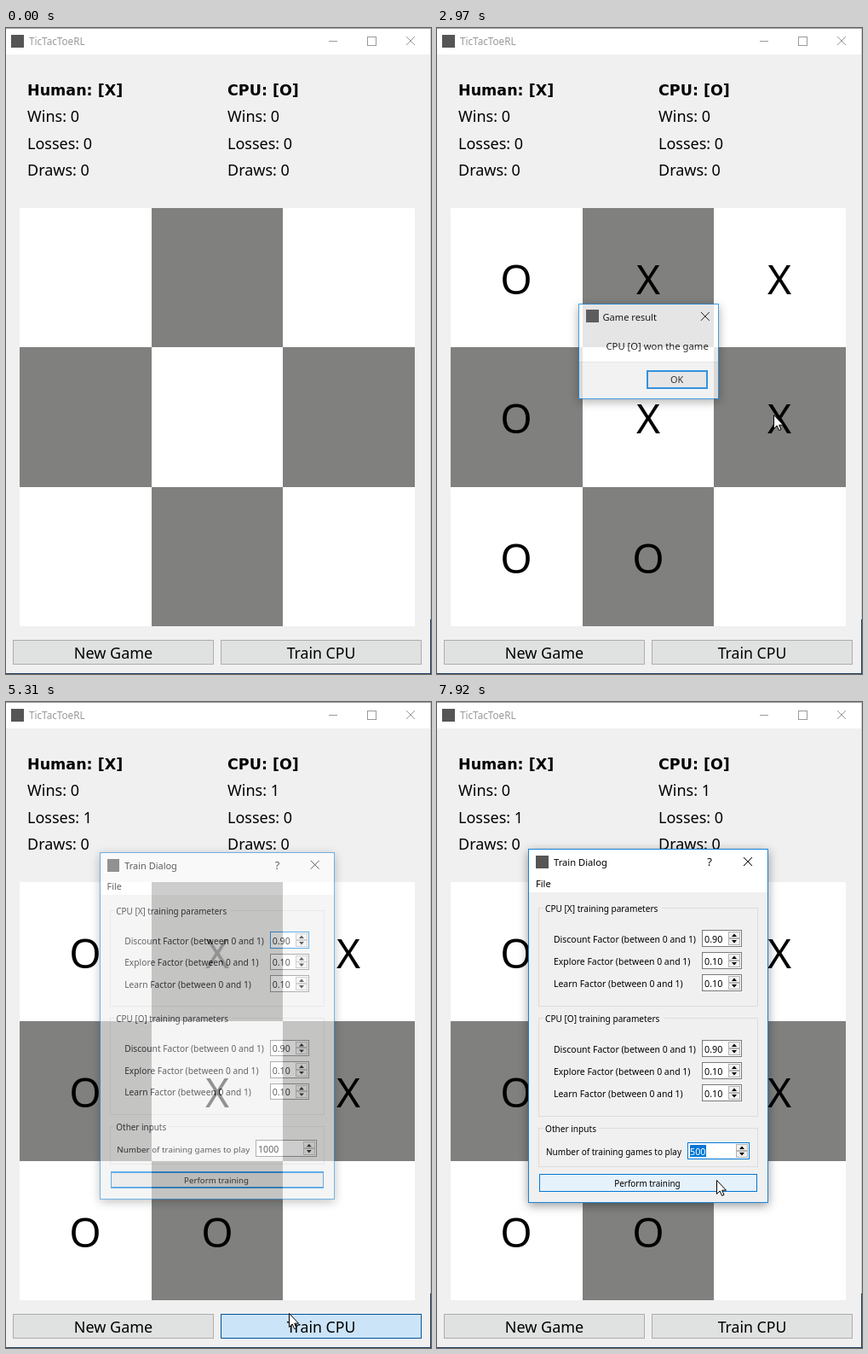
These frames come from a looping animation (499x757 px, 8000 ms). An HTML page:

```html
<!DOCTYPE html>
<html lang="en">
<head>
<meta charset="utf-8">
<title>TicTacToeRL</title>
<style>
html, body { margin: 0; width: 100%; height: 100%; overflow: hidden; background: #f0f0f0; }
svg { display: block; font-family: "Noto Sans", "Open Sans", sans-serif; }
rect { shape-rendering: crispEdges; }
.bold { font-family: "DejaVu Sans", sans-serif; font-weight: bold; }
.shadow { filter: drop-shadow(0 3px 6px rgba(0, 0, 0, .4)); }
</style>
</head>
<body>
<svg id="stage" width="499" height="757" viewBox="0 0 499 757"></svg>
<script>
const LOOP = 8000, TICK = 77.17, FIRST_TICK = 808;
const BLUE = '#0078d7', FRAME = '#1883d7', FACE = '#f0f0f0', BUTTON = '#e0e1e1';
const stage = document.getElementById('stage');
const clamp = v => Math.max(0, Math.min(1, v));

// Column, row, mark and the tick at which it is played
const MOVES = [
  [1, 1, 'X', 0], [0, 0, 'O', 0], [2, 0, 'X', 10], [0, 2, 'O', 11],
  [1, 0, 'X', 18], [1, 2, 'O', 19], [2, 1, 'X', 25], [0, 1, 'O', 26]
];

// Pointer path: tick, x, y
const PATH = [
  [-10, 370, 652], [-9, 301, 422], [-7, 301, 422], [-4, 250, 453], [1, 250, 453],
  [7, 365, 334], [12, 365, 334], [15, 275, 353], [20, 275, 353], [22, 349, 422],
  [23, 349, 422], [24, 395, 453], [32, 395, 453], [38, 303, 417], [43, 303, 417],
  [47, 317, 674], [48, 317, 674], [50, 332, 707], [53, 332, 707], [54, 332, 716],
  [60, 332, 716], [64, 278, 425], [66, 278, 425], [69, 303, 458], [70, 303, 458],
  [79, 354, 530], [85, 354, 530], [91, 328, 560]
];

const rect = (x, y, w, h, fill, extra = '') =>
  `<rect x="${x}" y="${y}" width="${w}" height="${h}" fill="${fill}" ${extra}/>`;
const box = (x, y, w, h, fill, stroke, line = 1) =>
  rect(x + line / 2, y + line / 2, w - line, h - line, fill, `stroke="${stroke}" stroke-width="${line}"`);
const text = (x, y, size, str, extra = '') =>
  `<text x="${x}" y="${y}" font-size="${size}" ${extra}>${str}</text>`;
const centered = (x, y, size, str) => text(x, y, size, str, 'text-anchor="middle"');
const path = (d, stroke, fill = 'none') => `<path d="${d}" stroke="${stroke}" fill="${fill}"/>`;
const group = (content, opacity) => opacity > 0 ? `<g opacity="${opacity}">${content}</g>` : '';
const closeIcon = (x, y, color) =>
  path(`M${x - 5} ${y - 5}l10 10m0 -10l-10 10`, color);
const appIcon = (x, y) => rect(x, y, 15, 15, '#555');

function pointer(tick) {
  let i = PATH.findIndex(p => p[0] > tick);
  if (i < 0) i = PATH.length;
  const a = PATH[i - 1], b = PATH[i] || a;
  const part = a === b ? 0 : (tick - a[0]) / (b[0] - a[0]);
  const x = Math.round(a[1] + (b[1] - a[1]) * part);
  const y = Math.round(a[2] + (b[2] - a[2]) * part);
  return `<g transform="translate(${x} ${y})">` +
    path('M.5 .5V16.5L4.2 13 6.6 18.5 9 17.5 6.7 12.2H11.5Z', '#000', '#fff') + '</g>';
}

function score(x, name, wins, losses) {
  return text(x, 79, 17.5, name, 'class="bold"') +
    text(x, 110, 18, `Wins: ${wins}`) +
    text(x, 142, 18, `Losses: ${losses}`) +
    text(x, 173, 18, 'Draws: 0');
}

function mainWindow(tick) {
  const active = tick >= 0 && tick < 27 || tick >= 40 && tick < 57;
  const ink = active ? '#000' : '#999', lost = +(tick >= 40);
  let out = rect(0, 0, 499, 757, FACE) + rect(0, 0, 499, 31, '#fff') +
    rect(0, 0, 499, 1, active ? FRAME : '#a0a0a0') +
    rect(498, 1, 1, 756, active ? FRAME : '#c8ccd0') +
    rect(0, 756, 499, 1, active ? FRAME : '#1c3f5e');
  if (!active) out += rect(498, 693, 1, 64, '#1c3f5e');
  out += appIcon(6, 8) + text(27, 20, 11.7, 'TicTacToeRL', `fill="${ink}"`) +
    rect(379, 15, 10, 1, ink) + box(424, 10, 11, 11, 'none', ink) + closeIcon(475, 15, ink) +
    score(25, 'Human: [X]', 0, lost) + score(260, 'CPU: [O]', lost, 0);

  const cols = [16, 171, 325, 480], rows = [211, 374, 538, 701];
  for (let c = 0; c < 3; c++) for (let r = 0; r < 3; r++)
    out += rect(cols[c], rows[r], cols[c + 1] - cols[c], rows[r + 1] - rows[r],
      (c + r) % 2 ? '#80807f' : '#fff');
  for (const [c, r, mark, at] of MOVES)
    if (tick >= at) out += centered([93, 248, 402][c], [312, 475, 639][r], 48, mark);

  out += box(8, 717, 236, 29, BUTTON, '#adadad') + box(252, 717, 236, 29, BUTTON, '#adadad');
  if (tick >= 54) {
    const pressed = tick >= 56;
    out += group(box(252, 717, 236, 29, pressed ? '#cce4f7' : '#e5f1fb', pressed ? '#005499' : BLUE),
      1 - clamp((tick - 58) / 3));
  }
  return out + centered(126, 739, 18, 'New Game') + centered(370, 739, 17.7, 'Train CPU');
}

// Dialogs fade and grow slightly around their centre
function dialog(x, y, w, h, alpha, content) {
  if (alpha <= 0) return '';
  const cx = x + w / 2, cy = y + h / 2, scale = .95 + .05 * alpha;
  return `<g opacity="${alpha}" transform="translate(${cx} ${cy}) scale(${scale}) translate(${-cx} ${-cy})">` +
    rect(x, y, w, h, '#fff', 'class="shadow"') + content + box(x, y, w, h, 'none', FRAME) + '</g>';
}

function resultDialog(tick) {
  const alpha = Math.min(clamp((tick - 26) / 2.5), clamp(1 - (tick - 39) / 3));
  const hover = tick >= 38;
  return dialog(165, 322, 167, 114, alpha,
    appIcon(174, 330) + text(194, 343, 11.2, 'Game result') + closeIcon(315.5, 337.5, '#000') +
    text(198, 377, 11.4, 'CPU [O] won the game') +
    rect(165, 392, 167, 44, FACE) + rect(165, 391, 167, 1, '#dfdfdf') +
    box(246, 401, 73, 22, hover ? '#e5f1fb' : '#e1e1e1', BLUE, hover ? 1 : 2) +
    centered(282, 416, 11, 'OK'));
}

function spinBox(x, y, w, value, focused, selected) {
  const bx = x + w - 16, mid = bx + 7;
  return box(x, y, w, 20, '#fff', focused ? BLUE : '#7a7a7a') +
    (selected ? rect(x + 3, y + 3, 19, 14, BLUE) : '') +
    text(x + 3, y + 15, 10.8, value, selected ? 'fill="#fff"' : '') +
    box(bx, y + 2, 14, 8, '#f0f0f0', '#b4b4b4') + box(bx, y + 10, 14, 8, '#f0f0f0', '#b4b4b4') +
    path(`M${mid - 3} ${y + 8}h6l-3 -3.5z`, 'none', '#000') +
    path(`M${mid - 3} ${y + 12}h6l-3 3.5z`, 'none', '#000');
}

const groupBox = (y, h, title, width) =>
  box(119, y, 258, h, 'none', '#dcdcdc') + rect(125, y, width, 1, FACE) + text(127, y + 5, 10.1, title);

function factors(y, focused) {
  return [['Discount', '0.90'], ['Explore', '0.10'], ['Learn', '0.10']].map(([name, value], i) =>
    text(137, y + 15 + i * 26, 10.45, `${name} Factor (between 0 and 1)`) +
    spinBox(311, y + i * 26, 47, value, focused && !i)).join('');
}

function trainDialog(tick) {
  const changed = tick >= 82;
  const caret = !changed && Math.floor((tick - 60) / 6.87) % 2 === 0;
  const hover = clamp((tick - 87) / 4);
  return dialog(107, 172, 282, 415, clamp((tick - 56.3) / 2.8),
    rect(108, 223, 280, 363, FACE) + appIcon(116, 180) + text(137, 192, 11.2, 'Train Dialog') +
    centered(320, 192, 13, '?') + closeIcon(365, 187, '#000') + text(116, 217, 11, 'File') +
    groupBox(241, 116, 'CPU [X] training parameters', 139) + factors(267, tick < 86) +
    (caret ? rect(314, 271, 1, 13, '#000') : '') +
    groupBox(370, 116, 'CPU [O] training parameters', 141) + factors(396, false) +
    groupBox(499, 46, 'Other inputs', 65) +
    text(128, 531, 10, 'Number of training games to play') +
    spinBox(294, 516, 73, changed ? '500' : '1000', tick >= 79, changed) +
    box(120, 553, 256, 21, '#e1e1e1', BLUE, 2) +
    group(box(120, 553, 256, 21, '#e5f1fb', BLUE), hover) +
    centered(247, 568, 9.9, 'Perform training'));
}

let lastKey;
function draw() {
  const time = performance.now() % LOOP;
  const tick = Math.floor((time - FIRST_TICK) / TICK);
  const showPointer = time >= 70;
  const key = `${tick} ${showPointer}`;
  if (key !== lastKey) {
    lastKey = key;
    stage.innerHTML = mainWindow(tick) + resultDialog(tick) + trainDialog(tick) +
      (showPointer ? pointer(tick) : '');
  }
  requestAnimationFrame(draw);
}
draw();
</script>
</body>
</html>
```
